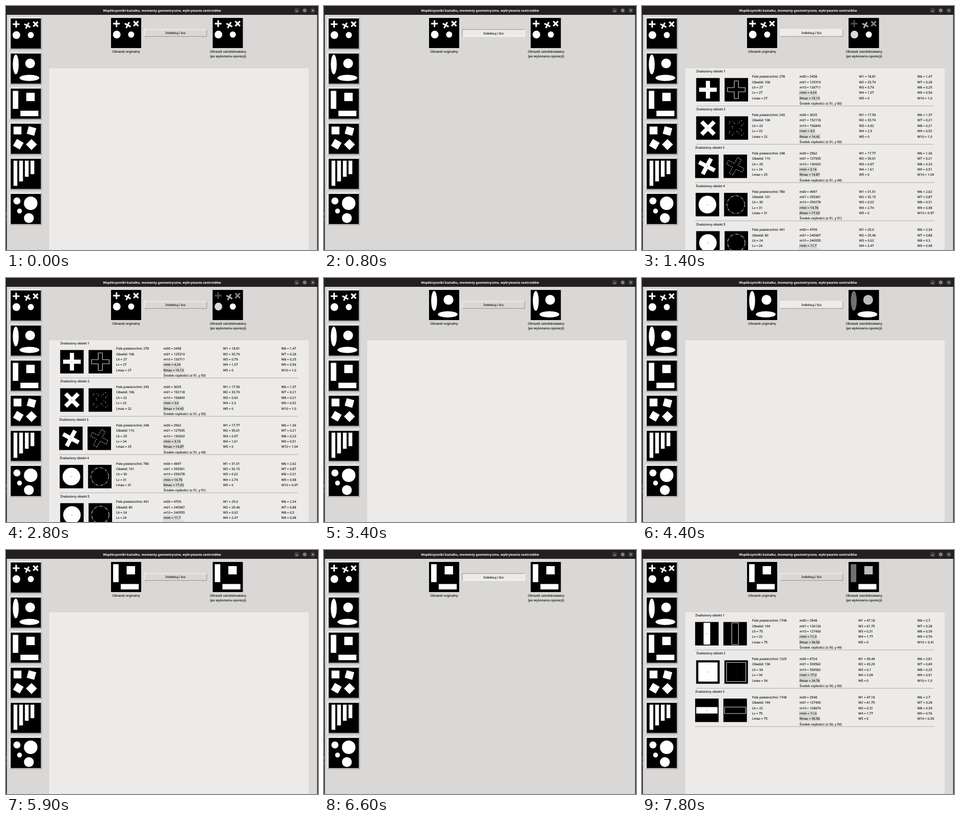
An HTML page for the animation above (8000 ms loop, 600 by 470 pixels).

```html
<!DOCTYPE html>
<html lang="pl">
<head>
<meta charset="utf-8">
<title>Współczynniki kształtu</title>
<style>
html, body { margin: 0; width: 100%; height: 100%; overflow: hidden; background: #d9d8d7; }
svg { display: block; width: 600px; height: 470px; }
text { font: 6.2px "Noto Sans", "Open Sans", sans-serif; fill: #111; stroke: #111; stroke-width: .12px;
  text-rendering: geometricPrecision; white-space: pre; }
.title { font-weight: 700; fill: #fff; stroke: none; }
.mid { text-anchor: middle; }
.face { fill: #d9d8d7; }
.hover .face, .press .face { fill: #ecebea; }
.lit { stroke: #fafafa; fill: none; }
.shade { stroke: #8f8e8d; fill: none; }
.press .lit { stroke: #8f8e8d; }
.press .shade { stroke: #fafafa; }
.press text { transform: translateY(1px); }
.mark { fill: #d9d8d7; }
.rule { stroke: #a6a5a4; stroke-width: .9; }
.white { fill: #fff; }
.edge { fill: none; stroke: #d4d4d4; stroke-width: 1.1; }
</style>
</head>
<body>
<svg id="stage" viewBox="0 0 600 470"></svg>
<script>
const stage = document.getElementById('stage');

// Shape helpers
const rect = (x, y, w, h, attr = '') => `<rect x="${x}" y="${y}" width="${w}" height="${h}" ${attr}/>`;
const oval = (x, y, rx, ry = rx, attr = '') => `<ellipse cx="${x}" cy="${y}" rx="${rx}" ry="${ry}" ${attr}/>`;
const tilted = (x, y, size, angle) =>
  rect(-size / 2, -size / 2, size, size, `transform="translate(${x} ${y}) rotate(${angle})"`);
const cross = (x, y, scale, angle, attr = '') =>
  `<path d="M-4-17H4V-4H17V4H4V17H-4V4H-17V-4H-4Z" transform="translate(${x} ${y}) rotate(${angle}) scale(${scale})" ${attr}/>`;
const text = (x, y, s, cls = '') => `<text x="${x}" y="${y}" class="${cls}">${s}</text>`;
const group = (attr, body) => `<g ${attr}>${body}</g>`;
const move = (x, y, body) => group(`transform="translate(${x} ${y})"`, body);

const pictures = [
  [cross(10.5, 11, .38, 0), cross(48, 11, .38, 45), cross(32, 13.8, .38, 28), oval(11, 32, 7.4), oval(38.7, 32, 5.9)],
  [oval(9.8, 21, 5.7, 19), oval(37.4, 19, 9.4), oval(36, 47, 19, 6)],
  [rect(4, 4.3, 10.6, 34.6), rect(30, 8, 16.2, 16), rect(18.7, 42.5, 34.6, 10.5)],
  [rect(5.5, 5.5, 15.2, 15), tilted(40, 14, 15, 15), tilted(14.7, 39.5, 15, 30), tilted(40, 40, 15, 45)],
  [48.5, 40, 31, 26].map((h, i) => rect(5.5 + 10.9 * i, 3.5, 7.2, h)),
  [oval(12, 13.5, 6.8), oval(38.5, 18, 13), oval(17, 33, 4.7), oval(35, 46.5, 9.5)]
];

function thumb(x, y, shapes, indexed) {
  const body = shapes.map((s, i) => {
    const v = indexed ? Math.round(255 * ((i + 1) / shapes.length) ** .75) : 255;
    return group(`fill="rgb(${v},${v},${v})"`, s);
  }).join('');
  return move(x, y, rect(0, 0, 58, 58) + body);
}

function button(id, x, y, w, h, body) {
  return group(`id="${id}"`, rect(x, y, w, h, 'class="face"')
    + `<path class="lit" d="M${x + .5} ${y + h}V${y + .5}H${x + w}"/>`
    + `<path class="shade" d="M${x + .5} ${y + h - .5}H${x + w - .5}V${y}"/>` + body);
}

// Rows: shape, dash, left shift, then area, perimeter, Lh, Lv, Lmax | moments | W1..W10
const plus = angle => attr => cross(0, 0, 1, angle, attr);
const disc = (rx, ry) => attr => oval(0, 0, rx, ry, attr);
const slab = (w, h) => attr => rect(-w / 2, -h / 2, w, h, attr + ' rx=".8"');
const results = [
  [
    [plus(0), '', 0, '278 106 27 27 27', '2458 125319 126711 4.24 15.13', '51 50', '18.81 33.74 0.79 1.07 0 1.47 0.28 0.25 0.56 1.0'],
    [plus(45), '2 7 1 3', 0, '243 106 22 22 22', '3025 152118 156843 3.0 14.42', '51 50', '17.59 33.74 0.92 2.3 0 1.37 0.21 0.21 0.52 1.0'],
    [plus(28), '2 2', -2, '248 110 25 24 25', '2562 127935 130920 3.16 14.87', '51 49', '17.77 35.01 0.97 1.61 0 1.36 0.21 0.23 0.51 1.04'],
    [disc(17, 17), '5 2 1 2', -1, '780 101 30 31 31', '4997 255361 259278 14.76 17.03', '51 51', '31.51 32.15 0.02 2.74 0 2.62 0.87 0.31 0.98 0.97'],
    [disc(16.8, 16.8), '6 2 1 2', 0, '491 80 24 24 24', '4709 240967 240555 11.7 13.42', '51 51', '25.0 25.46 0.02 2.47 0 2.34 0.88 0.3 0.98 1.0']
  ],
  [
    [disc(6.2, 20), '4 2', -2, '1491 174 25 79 79', '2364 118672 117980 11.7 39.2', '50 50', '43.57 55.39 0.27 2.02 0 2.71 0.3 0.31 0.81 3.16'],
    [disc(17.5, 17.5), '5 2 1 2', 0, '1205 126 39 39 39', '4926 247412 248160 18.6 20.12', '50 50', '39.17 40.11 0.02 2.81 0 2.71 0.92 0.31 0.98 1.0'],
    [disc(20, 6.2), '4 2', -2, '1494 174 79 25 79', '2370 118340 119216 11.7 39.2', '50 50', '43.61 55.39 0.27 2.02 0 2.71 0.3 0.31 0.81 0.32']
  ],
  [
    [slab(12.8, 42), '', -2, '1748 194 75 22 75', '2548 126126 127400 11.0 39.56', '50 49', '47.18 61.75 0.31 1.77 0 2.7 0.28 0.39 0.76 3.41'],
    [slab(37, 37), '', 0, '1225 136 34 34 34', '6724 339562 339562 17.0 24.76', '50 50', '39.49 43.29 0.1 2.09 0 2.81 0.69 0.25 0.91 1.0'],
    [slab(41, 12.5), '', -2, '1748 194 22 75 75', '2548 127400 128674 11.0 39.56', '50 50', '47.18 61.75 0.31 1.77 0 2.7 0.28 0.39 0.76 0.29']
  ]
];
const names = [
  ['Pole powierzchni: ', 'Obwód: ', 'Lh = ', 'Lv = ', 'Lmax = '],
  ['m00 = ', 'm01 = ', 'm10 = ', 'rmin = ', 'Rmax = ']
];

function resultRow([shape, dash, dx, size, moments, centre, factors], i, set) {
  const lineY = k => 138.3 + 10.37 * k;
  const column = (x, labels, values) =>
    values.map((v, k) => text(x, lineY(k), labels[k] + v, /^r(min)|^Rmax/.test(labels[k]) ? 'shaded' : '')).join('');
  const w = factors.split(' '), [cx, cy] = centre.split(' ');
  const label = k => `W${k} = `;
  const left = 104.2 + dx, gap = set === 2 ? 54.3 : 54.6;
  const wx = set ? 416 : 417.6;
  return move(0, 73.75 * i,
    text(left + .3, 127.6, 'Znaleziony obiekt ' + (i + 1))
    + move(left, 138.7, rect(0, 0, 45.2, 45.2) + rect(gap, 0, 45.2, 45.2)
      + move(22.6, 22.6, shape('class="white"') + oval(0, 0, .7, .7, 'fill="#555"'))
      + move(gap + 22.6, 22.6, shape(`class="edge" stroke-dasharray="${dash || 'none'}"`)))
    + column(211.7, names[0], size.split(' '))
    + column(302.9, names[1], moments.split(' '))
    + text(302.9, lineY(5), `Środek ciężkości: (x ${cx}, y ${cy})`)
    + column(wx, [1, 2, 3, 4, 5].map(label), w.slice(0, 5))
    + column(529.6, [6, 7, 8, 9, 10].map(label), w.slice(5))
    + `<path class="rule" d="M${left - .2} 192.6H${560.5 - dx}"/>`);
}

// Window
const dark = 'fill="#231f21"';
const controls = [559, 574.5, 590].map(x => oval(x, 8.6, 5.1, 5.1, 'fill="#3d393b"')).join('')
  + '<path d="M557 10H561M572.7 6.8h3.6v3.6h-3.6zM588.2 6.8l3.6 3.6m0-3.6l-3.6 3.6" fill="none" stroke="#fff" stroke-width=".8"/>';

stage.innerHTML =
  rect(0, 0, 600, 470, 'fill="#d9d8d7"')
  + rect(0, 0, 600, 17, dark) + rect(0, 0, 1.6, 470, dark) + rect(598.5, 0, 1.5, 470, dark)
  + rect(0, 398, 1.2, 5, 'fill="#666"') + rect(0, 409, 1.2, 4, 'fill="#666"')
  + text(300, 10.9, 'Współczynniki kształtu, momenty geometryczne, wykrywanie centroidów', 'title mid') + controls
  + pictures.map((p, i) => {
    const y = 24 + 67.6 * i;
    return button('side' + i, 7, y - 2, 62, 62, thumb(9, y, p));
  }).join('')
  + pictures.slice(0, 3).map((p, i) =>
    group(`id="plain${i}"`, thumb(202, 23, p) + thumb(397.5, 23, p))
    + group(`id="indexed${i}"`, thumb(397.5, 23, p, true))).join('')
  + text(231, 90.2, 'Obrazek orginalny', 'mid')
  + text(427, 90.2, 'Obrazek zaindeksowany', 'mid')
  + text(427, 99, '(po wykonaniu operacji)', 'mid')
  + button('run', 265.6, 44.7, 121, 14.5, text(326, 54.3, 'Indeksuj i licz', 'mid'))
  + group('id="panel"', rect(83, 120, 499, 350, 'fill="#ecebea"'))
  + results.map((rows, s) => group(`id="result${s}"`, rows.map((r, i) => resultRow(r, i, s)).join(''))).join('');

for (const label of stage.querySelectorAll('.shaded')) {
  const w = label.getComputedTextLength();
  label.insertAdjacentHTML('beforebegin',
    rect(label.getAttribute('x') - .8, label.getAttribute('y') - 7.3, w + 1.6, 10.2, 'class="mark"'));
}

// Timeline: [start in ms, value]
const runStates = [[0, ''], [200, 'hover'], [600, 'press'], [900, 'hover'], [2000, ''], [3800, 'hover'], [4100, 'press'],
  [4300, 'hover'], [5300, ''], [6200, 'hover'], [6400, 'press'], [6800, 'hover'], [7400, '']];
const sideStates = [[0, -1], [3100, 1], [3700, -1], [5500, 2], [6100, -1], [7600, 3]];
const shownPicture = [[0, 0], [3300, 1], [5800, 2]];
const phases = [[0, 'idle'], [800, 'blank'], [900, 'indexed'], [1000, 'done'], [3300, 'idle'], [4300, 'blank'],
  [4400, 'indexed'], [4500, 'done'], [5800, 'idle'], [6600, 'blank'], [6800, 'indexed'], [6900, 'done']];

const at = (steps, t) => steps.filter(s => s[0] <= t).pop()[1];
const el = id => document.getElementById(id);
const show = (id, on) => { el(id).style.display = on ? '' : 'none'; };
const start = performance.now();

function draw() {
  const t = Math.max(0, performance.now() - start) % 8000;
  const picture = at(shownPicture, t), phase = at(phases, t), side = at(sideStates, t);
  el('run').setAttribute('class', at(runStates, t));
  pictures.forEach((_, i) => el('side' + i).setAttribute('class', i === side ? 'hover' : ''));
  for (let i = 0; i < 3; i++) {
    const current = i === picture;
    show('plain' + i, current);
    show('indexed' + i, current && (phase === 'indexed' || phase === 'done'));
    show('result' + i, current && phase === 'done');
  }
  show('panel', phase !== 'blank');
  requestAnimationFrame(draw);
}
draw();
</script>
</body>
</html>
```
